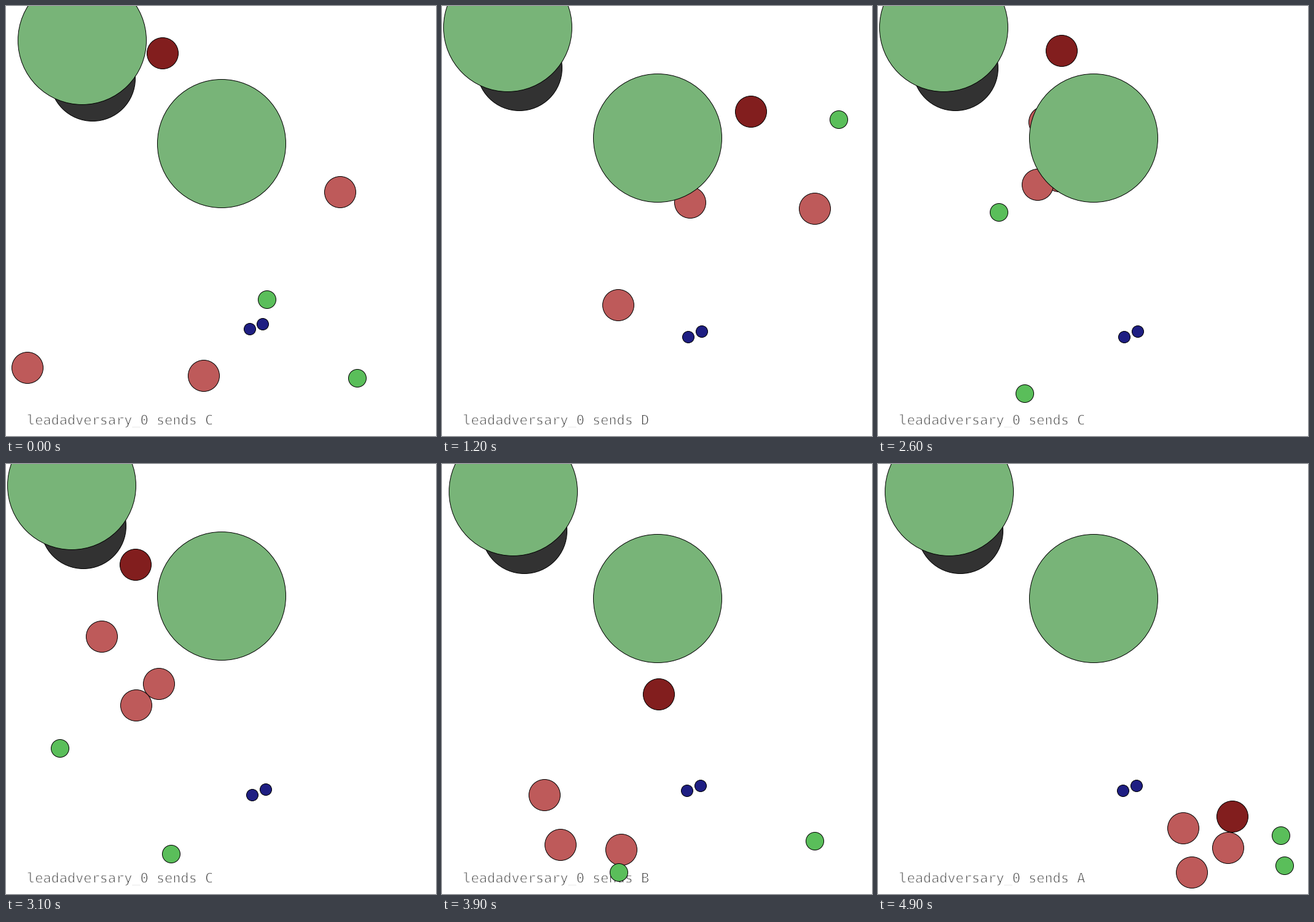
A matplotlib script that plays this animation: 700x700 px, repeating every 5000 ms.

```python
import numpy as np
import matplotlib.pyplot as plt
from matplotlib.animation import FuncAnimation
from matplotlib.patches import Circle
from matplotlib.patheffects import Normal, Stroke

SIZE, FRAMES, INTERVAL = 700, 50, 100
REACH = 315          # the view zooms out to keep every body this close to the centre
PIXEL = 0.72         # one pixel in points at 100 dpi

LEAD, HUNTER, RUNNER = "#821e1e", "#be5a5a", "#5abe5a"
ROCK, FOOD, FOREST = "#323232", "#1e1e82", "#78b478"

# Turning points of each moving body, relative to the stage centre
TURNS = [0, 6, 12, 20, 31, 39, 49]
MOVERS = [
    (26, LEAD, "-102,-293 30,-195 153,-178 104,-313 -139,-186 3,26 235,232"),
    (26, HUNTER, "208,-50 237,74 257,-20 99,-180 -194,-69 -189,196 152,251"),
    (26, HUNTER, "-30,270 39,185 54,-30 20,-95 -101,8 -60,288 228,285"),
    (26, HUNTER, "-338,256 -183,255 -63,137 -40,-85 -138,43 -162,279 167,326"),
    (15, RUNNER, "81,137 81,11 40,-100 -47,210 -81,285 266,273 317,264"),
    (15, RUNNER, "238,275 270,101 296,-165 78,-130 -262,113 -64,326 323,315"),
]
LANDMARKS = [(70, ROCK, (-224, -249.4)), (10, FOOD, (50.6, 188.8)),
             (10, FOOD, (73, 180)), (105, FOREST, (-242.6, -315.4)),
             (105, FOREST, (0.7, -135.4))]

MESSAGES = "C" * 3 + "A" * 6 + "D" * 5 + "A" * 3 + "D" * 5 + "C" * 12 + "B" * 8 + "A" * 8


def travel(turns):
    """Smooth path through the turning points, starting from rest."""
    p = np.array([turn.split(",") for turn in turns.split()], float)
    t, f = np.array(TURNS), np.arange(FRAMES)
    slope = np.gradient(p, t, axis=0)
    slope[0] = 0
    i = np.clip(np.searchsorted(t, f, side="right") - 1, 0, len(t) - 2)
    h = (t[i + 1] - t[i])[:, None]
    u = (f - t[i])[:, None] / h
    return ((1 + 2 * u) * (1 - u) ** 2 * p[i] + u * (1 - u) ** 2 * h * slope[i]
            + u * u * (3 - 2 * u) * p[i + 1] + u * u * (u - 1) * h * slope[i + 1])


fig = plt.figure(figsize=(SIZE / 100, SIZE / 100), dpi=100, facecolor="white")
ax = fig.add_axes([0, 0, 1, 1])
ax.set(xlim=(0, SIZE), ylim=(SIZE, 0))
ax.axis("off")

bodies = []


def add_body(track, radius, color):
    disc = Circle((0, 0), radius - 0.5, facecolor=color, edgecolor="black",
                  linewidth=PIXEL, snap=False, zorder=len(bodies) + 1)
    ax.add_patch(disc)
    bodies.append((disc, track))


for radius, color, turns in MOVERS:
    add_body(travel(turns), radius, color)
for radius, color, place in LANDMARKS:
    add_body(np.tile(place, (FRAMES, 1)), radius, color)

# The caption lies above the lead and below everything else
caption = ax.text(34, 681.5, "", family="DejaVu Sans Mono", fontsize=21.9 * PIXEL,
                  color="#303030", va="baseline", zorder=1.5)
caption.set_path_effects([Normal(), Stroke(linewidth=PIXEL, foreground="white")])


def draw(frame):
    movers = bodies[:len(MOVERS)]
    farthest = max(np.abs(track[frame]).max() for _, track in movers)
    zoom = REACH / max(REACH, farthest)
    for disc, track in bodies:
        disc.center = np.round(SIZE / 2 + track[frame] * zoom)
    caption.set_text(f"leadadversary_0 sends {MESSAGES[frame]}")
    return [disc for disc, _ in bodies] + [caption]


anim = FuncAnimation(fig, draw, frames=FRAMES, interval=INTERVAL,
                     repeat=True, repeat_delay=0)
plt.show()
```
